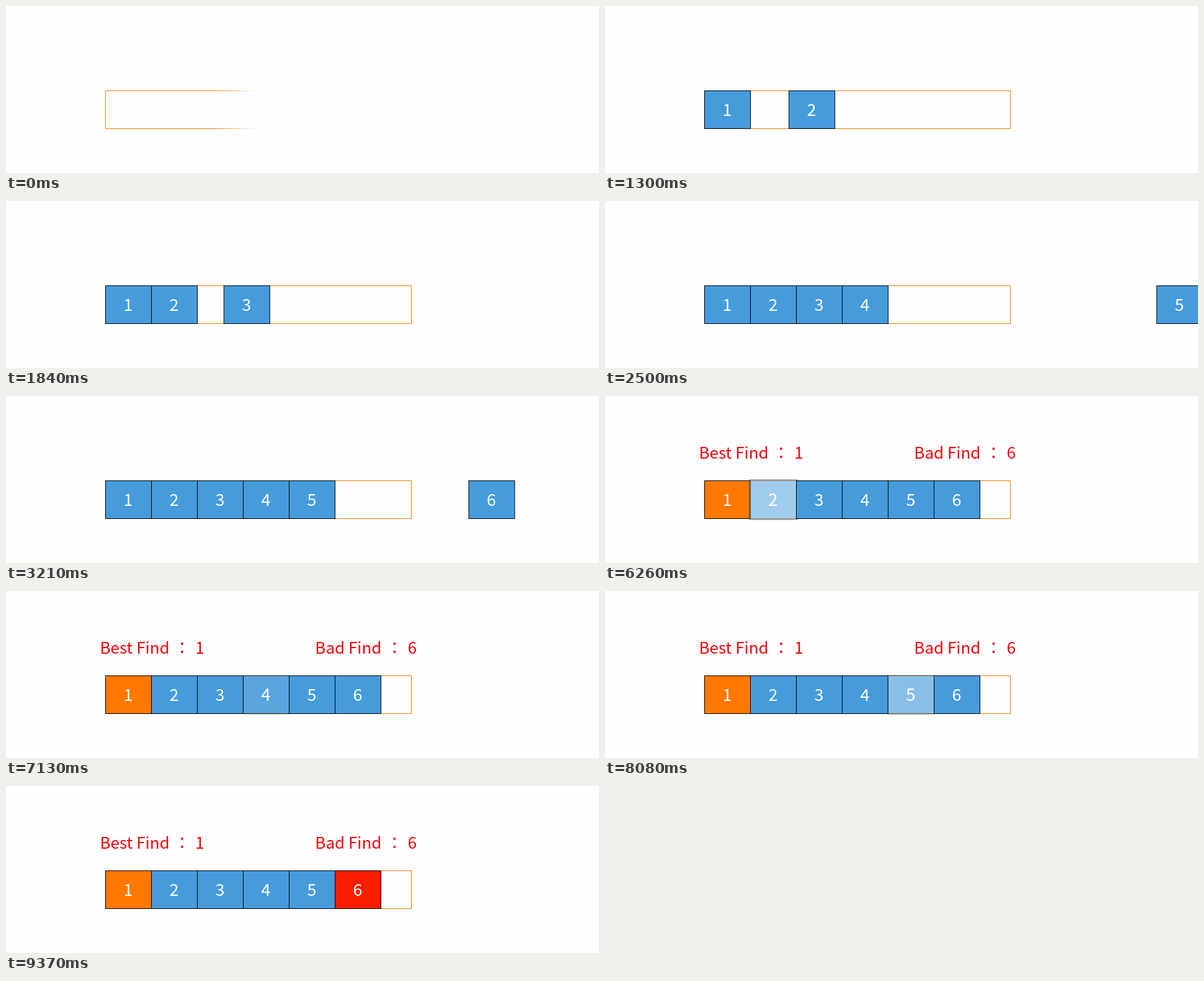
These frames come from a looping animation (956 by 269 pixels, 9.47 s). An HTML page:

```html
<!DOCTYPE html>
<html lang="en">
<head>
<meta charset="utf-8">
<title>Best and bad find</title>
<style>
  html, body { margin: 0; width: 100%; height: 100%; overflow: hidden; background: #fefefe; }
  svg { display: block; }
  text { font-family: "Noto Sans CJK SC", "Noto Sans CJK JP", "Noto Sans", sans-serif; }
  .digit { font-size: 27px; fill: #fff; text-anchor: middle; }
  .label { font-size: 26px; fill: #f5000a; }
  .mid { text-anchor: middle; }
  .colon { font-family: "Noto Sans CJK JP", "Noto Sans CJK SC", sans-serif; }
</style>
</head>
<body>
<svg id="stage" width="956" height="269" viewBox="0 0 956 269">
  <defs>
    <linearGradient id="edge" gradientUnits="userSpaceOnUse" y1="0" y2="0">
      <stop offset="0" stop-color="#fff"/>
      <stop offset="1" stop-color="#fff" stop-opacity="0"/>
    </linearGradient>
    <mask id="wipe" maskUnits="userSpaceOnUse" x="0" y="0" width="956" height="269">
      <rect width="956" height="269" fill="url(#edge)"/>
    </mask>
  </defs>
  <g mask="url(#wipe)">
    <rect x="160.5" y="136.5" width="493" height="61" fill="none" stroke="#f87a00"/>
  </g>
</svg>
<script>
const LOOP = 9470, STEP = 500;
const LEFT = 160.5, TOP = 136.5, W = 74, H = 61, OFF = 956.5;
const BLUE = [70, 155, 219], GRAY = [154, 144, 143], ORANGE = [255, 120, 0], RED = [250, 30, 0];

const stage = document.getElementById("stage");
const edge = document.getElementById("edge");
const ramp = (t, start, length = STEP) => Math.min(1, Math.max(0, (t - start) / length));
const mix = (a, b, k) => a.map((v, i) => v + (b[i] - v) * k);
const rgb = c => `rgb(${c.map(Math.round)})`;

function add(parent, tag, attrs, text = "") {
  const el = document.createElementNS("http://www.w3.org/2000/svg", tag);
  for (const key in attrs) el.setAttribute(key, attrs[key]);
  el.textContent = text;
  parent.append(el);
  return el;
}

function addLabel(words, x, colonX, digit, digitX) {
  const g = add(stage, "g", { class: "label" });
  add(g, "text", { x, y: 101 }, words);
  add(g, "text", { class: "mid colon", x: colonX, y: 101 }, "：");
  add(g, "text", { class: "mid", x: digitX, y: 101 }, digit);
  return g;
}

// Each block is drawn around its own centre so that it can scale in place.
function addBlock(_, i) {
  const g = add(stage, "g", {});
  const box = add(g, "rect", { x: -W / 2, y: -H / 2, width: W, height: H, stroke: "#000" });
  add(g, "text", { class: "digit", x: -0.6, y: 10 }, i + 1);
  return { g, box };
}

const best = addLabel("Best Find", 151.5, 284, 1, 312.5);
const bad = addLabel("Bad Find", 498.3, 626.5, 6, 655);
const blocks = Array.from({ length: 6 }, addBlock);

function fillOf(i, t) {
  if (i === 0) return mix(mix(BLUE, GRAY, ramp(t, 4000, 410)), ORANGE, ramp(t, 4410));
  return i === 5 ? mix(BLUE, RED, ramp(t, 8740)) : BLUE;
}

function drawBlock({ g, box }, i, t) {
  const x = OFF + (LEFT + i * W - OFF) * ramp(t, 314 + 530 * i);
  const pulse = ramp(t, 5475 + 545 * i);
  const grow = 1 - Math.abs(2 * pulse - 1);
  const fade = Math.min(0.5, 1.25 * grow);
  g.setAttribute("transform", `translate(${x + W / 2} ${TOP + H / 2}) scale(${1 + 0.05 * grow})`);
  g.setAttribute("opacity", 1 - fade);
  box.setAttribute("fill", rgb(fillOf(i, t)));
}

function draw(t) {
  const front = LEFT + 564 * ramp(t, -215);
  edge.setAttribute("x1", front - 68);
  edge.setAttribute("x2", front);
  best.setAttribute("opacity", ramp(t, 3494));
  bad.setAttribute("opacity", ramp(t, 4930));
  blocks.forEach((b, i) => drawBlock(b, i, t));
}

const begin = performance.now();
function tick() {
  draw((performance.now() - begin) % LOOP);
  requestAnimationFrame(tick);
}
tick();
</script>
</body>
</html>
```
